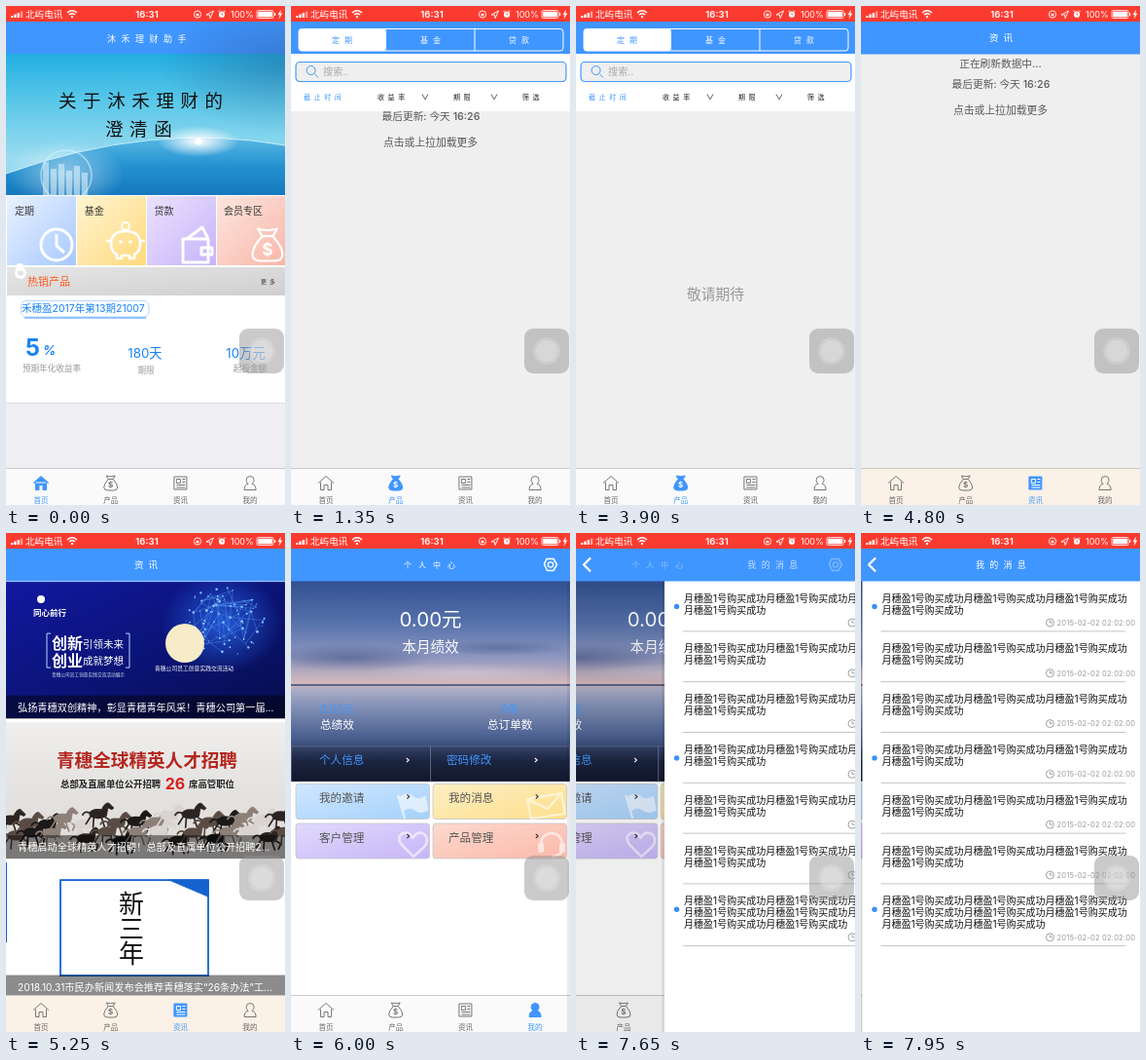
Write an HTML page that moves like this. It is 287 px wide and 512 px high and loops after 8000 ms.

```html
<!DOCTYPE html>
<html lang="zh-CN">
<head>
<meta charset="utf-8">
<title>理财助手</title>
<style>
html, body { margin: 0; width: 100%; height: 100%; overflow: hidden; background: #fff; }
svg { display: block; width: 100%; height: 100%; font-family: Inter, "Noto Sans CJK SC", "Noto Sans CJK", sans-serif; }
</style>
</head>
<body>
<svg id="stage" viewBox="0 0 287 512" preserveAspectRatio="none"></svg>
<script>
const BLUE = '#4096ff', GREY = '#efefef';
const STEP = 150, LOOP = 8000;
const stage = document.getElementById('stage');

let seed = 7;
const random = () => (seed = (seed * 16807) % 2147483647) / 2147483647;
const times = (n, fn) => Array.from({ length: n }, (_, i) => fn(i)).join('');

// y is the vertical centre of the glyphs
const text = (x, y, size, str, fill = '#333', attrs = '') =>
  `<text x="${x}" y="${y + size * .36}" font-size="${size}" fill="${fill}" ${attrs}>${str}</text>`;
const centered = (x, y, size, str, fill, attrs = '') =>
  text(x, y, size, str, fill, `text-anchor="middle" ${attrs}`);
const spaced = (x, y, size, gap, str, fill, attrs = '') =>
  text(x, y, size, str, fill, `letter-spacing="${gap}" ${attrs}`);
const rect = (x, y, w, h, fill, attrs = '') =>
  `<rect x="${x}" y="${y}" width="${w}" height="${h}" fill="${fill}" ${attrs}/>`;
const circle = (x, y, r, fill, attrs = '') => `<circle cx="${x}" cy="${y}" r="${r}" fill="${fill}" ${attrs}/>`;
const ellipse = (x, y, rx, ry, fill, opacity = 1) =>
  `<ellipse cx="${x}" cy="${y}" rx="${rx}" ry="${ry}" fill="${fill}" opacity="${opacity}"/>`;
const line = (d, stroke, width = 1, fill = 'none', attrs = '') =>
  `<path d="${d}" fill="${fill}" stroke="${stroke}" stroke-width="${width}" stroke-linejoin="round" ${attrs}/>`;
const group = (id, body, attrs = '') => `<g id="${id}" ${attrs}>${body}</g>`;
const at = (x, y, body, scale = 1) => `<g transform="translate(${x} ${y}) scale(${scale})">${body}</g>`;
const gradient = (id, colors, diagonal) =>
  `<linearGradient id="${id}" x2="${diagonal ? 1 : 0}" y2="1">${colors.map((c, i) => {
    const [color, offset = i / (colors.length - 1)] = c.split(' ');
    return `<stop offset="${offset}" stop-color="${color}"/>`;
  }).join('')}</linearGradient>`;
const radial = (id, color) =>
  `<radialGradient id="${id}"><stop stop-color="${color}"/><stop offset="1" stop-color="${color}" stop-opacity="0"/></radialGradient>`;

const defs = `<defs>
  ${gradient('sky', ['#22aee2', '#5cc8e9 .35', '#9cdcf0 .75', '#8ed4ee'])}
  ${gradient('earth', ['#58b8e4', '#2391d0 .5', '#1678be'])}
  ${gradient('dusk', ['#31508f', '#5470ab .2', '#8d96bf .38', '#d5b9bd .51', '#adadc6 .54', '#8593b8 .62', '#4a5f90 .78', '#1f2948 .9', '#141a30'])}
  ${gradient('night', ['#1218a0', '#0b1478', '#060d4c'], true)}
  ${gradient('mist', ['#f0efee', '#e4e2e0', '#dedbd8'])}
  ${gradient('blueCard', ['#e9f2ff', '#a7c9ff'], true)}
  ${gradient('yellowCard', ['#fff5d2', '#ffd97d'], true)}
  ${gradient('purpleCard', ['#ebe2fd', '#c6b3fb'], true)}
  ${gradient('pinkCard', ['#fde6df', '#f9b6a8'], true)}
  ${gradient('blueTile', ['#cfe6ff', '#a5d1fb'], true)}
  ${gradient('yellowTile', ['#fdefc4', '#fddf8c'], true)}
  ${gradient('purpleTile', ['#e0dafc', '#c7b5f8'], true)}
  ${gradient('pinkTile', ['#fdd9ce', '#fbb9aa'], true)}
  ${gradient('silver', ['#e6e6e6', '#cfcfcf'], true)}
  ${radial('glow', '#fff')}${radial('blueGlow', '#2a6cf0')}${radial('shade', '#1f3566')}
  <clipPath id="listArea"><rect y="108" width="287" height="366"/></clipPath>
  <clipPath id="feedArea"><rect y="49" width="287" height="463"/></clipPath>
</defs>`;

const navBar = body => rect(0, 16, 287, 33.5, BLUE) + body;
const bag = (color, fill, sign) =>
  line('M-2.5-4 L-4.5-7.5 Q0-6 4.5-7.5 L2.5-4 Z M-2.5-4 Q-7 1 -7 4.5 Q-7 7.5 -3 7.5 H3 Q7 7.5 7 4.5 Q7 1 2.5-4', color, 1, fill)
  + centered(0, 2, 8, '$', sign, 'font-weight="bold"');

const tabIcons = [
  on => line('M-8 0 L0-7 L8 0 M-5.5-1 V7 H-2 V2 H2 V7 H5.5 V-1', on ? BLUE : '#777', 1, on ? BLUE : 'none'),
  on => bag(on ? BLUE : '#777', on ? BLUE : 'none', on ? '#fff' : '#777'),
  on => line('M-6.5-6.5 H6.5 V6.5 H-6.5 Z', on ? BLUE : '#777', 1, on ? BLUE : 'none')
    + line('M-4-4 H0 V0 H-4 Z M2-4 H5 M2-1 H5 M-4 2 H5 M-4 4.5 H5', on ? '#fff' : '#777'),
  on => line('M-6 7 Q-6 1.5 -2 1 Q-4-1 -4-3 A4 4 0 0 1 4-3 Q4-1 2 1 Q6 1.5 6 7 Z', on ? BLUE : '#777', 1, on ? BLUE : 'none')
];
const tabBar = (selected, fill = '#fafafa') =>
  rect(0, 474, 287, 38, fill) + rect(0, 474, 287, .7, '#b5b5b5') +
  ['首页', '产品', '资讯', '我的'].map((label, i) => {
    const on = i === selected, x = 36 + i * 71.7;
    return at(x, 489.5, tabIcons[i](on)) + centered(x, 507, 7.5, label, on ? BLUE : '#666', 'font-weight="500"');
  }).join('');

const cardIcons = [
  at(52, 245, circle(0, 0, 16, 'none', 'stroke="#fff" stroke-width="3"') + line('M0-11 V1 L8 8', '#fff', 3)),
  at(123, 243, line('M-15 1 Q-15-12 0-12 Q15-12 15 1 Q15 9 9 12 V16 H4 V13 H-4 V16 H-9 V12 Q-15 9 -15 1 Z M-15-2 H-20 M15-2 H20', '#fff', 2.6)
    + circle(0, -17, 4, 'none', 'stroke="#fff" stroke-width="2"') + circle(-5, -1, 1.8, '#fff') + circle(5, -1, 1.8, '#fff')),
  at(196, 247, line('M-14-8 H12 V16 H-14 Z M-10-8 L6-20 L12-8 M5 1 H16 V8 H5 Z', '#fff', 3)),
  at(269, 245, bag('#fff', 'none', '#fff'), 2.2)
];
const home = navBar(spaced(104, 34, 9, 5.5, '沐禾理财助手', '#fff'))
  + rect(0, 49, 287, 425, '#fff')
  + rect(0, 49, 287, 145, 'url(#sky)')
  + ellipse(287, 60, 130, 70, 'url(#shade)', .3)
  + line('M0 172 Q150 118 287 143 V194 H0 Z', 'none', 0, 'url(#earth)')
  + line('M0 172 Q150 118 287 143', '#c5edfa', 1)
  + ellipse(198, 139, 42, 16, 'url(#glow)') + circle(198, 139, 3.5, '#fff')
  + ellipse(62, 172, 60, 34, 'url(#glow)', .5)
  + circle(62, 174, 26, 'none', 'stroke="#d4f3fc" stroke-width="1.5" opacity=".6"')
  + times(6, i => rect(38 + i * 8, 160 + (i * 7) % 12, 6, 34 - (i * 7) % 12, '#e0f5fc', 'opacity=".55"'))
  + spaced(54, 97, 18.5, 6.6, '关于沐禾理财的', '#111', 'font-weight="500"')
  + spaced(102, 126, 18.5, 6.6, '澄清函', '#111', 'font-weight="500"')
  + ['blue', 'yellow', 'purple', 'pink'].map((c, i) => rect(1 + i * 72, 195, 71, 71, `url(#${c}Card)`)
    + text(9 + i * 71.7, 210, 10, ['定期', '基金', '贷款', '会员专区'][i])).join('')
  + cardIcons.join('')
  + rect(1, 268, 286, 29, 'url(#silver)')
  + circle(14, 268, 3, 'none', 'stroke="#fff" stroke-width="2"') + circle(15, 274, 4.5, 'none', 'stroke="#fff" stroke-width="3"')
  + text(22, 283, 11, '热销产品', '#ff5a1f', 'font-weight="500"') + spaced(262, 283, 6, 3, '更多', '#333')
  + rect(15.5, 302.5, 131.5, 16.5, '#fff', 'rx="5" stroke="#b7d7ff"') + text(16, 310.5, 10.5, '禾穗盈2017年第13期21007', '#1683f5')
  + rect(19, 319.5, 125, 1, BLUE)
  + text(20, 350, 24, '5', '#1683f5', 'font-weight="bold"') + text(38, 353, 13, '%', '#1683f5', 'font-style="italic" font-weight="bold"')
  + centered(143, 356, 13.3, '180天', '#1683f5') + centered(246.5, 356, 13.3, '10万元', '#1683f5')
  + centered(47, 372, 8.6, '预期年化收益率', '#999') + centered(144, 374, 8.6, '期限', '#999') + centered(251, 372, 8.6, '起投金额', '#999')
  + rect(0, 407, 287, 67, '#efeff4') + rect(0, 407, 287, .8, '#d9d9dd') + tabBar(0);

// pull-to-refresh header, 41 px tall, above the given top edge
const refreshHeader = top => centered(143.5, top - 31, 10.7, '正在刷新数据中...', '#5a5a5a', 'font-weight="500"')
  + centered(144, top - 10, 10.7, '最后更新: 今天 16:26', '#5a5a5a', 'font-weight="500"');
const loadMore = top => centered(143.5, top + 17, 10.8, '点击或上拉加载更多', '#5a5a5a', 'font-weight="500"');

const chevron = x => line(`M${x - 3} 90.5 L${x} 96 L${x + 3} 90.5`, '#666');
const products = navBar(rect(8, 23.5, 272, 22.5, 'none', 'rx="3" stroke="#fff"') + rect(8, 23.5, 90, 22.5, '#fff', 'rx="3"')
    + rect(188.5, 23.5, 1, 22.5, '#fff')
    + spaced(42, 35, 8, 5, '定期', BLUE) + spaced(133, 35, 8, 5, '基金', '#fff') + spaced(224, 35, 8, 5, '贷款', '#fff'))
  + rect(0, 49, 287, 59, '#fff') + rect(0, 108, 287, 366, GREY)
  + rect(5, 57.5, 278, 20, GREY, `rx="4" stroke="${BLUE}" stroke-width="1.2"`)
  + circle(20.5, 66, 4.5, 'none', `stroke="${BLUE}"`) + line('M24 69.5 L28 73.5', BLUE)
  + text(33, 67.5, 10.2, '搜索..', '#aaa')
  + spaced(13, 93.5, 7, 3.6, '截止时间', BLUE) + spaced(89, 93.5, 7, 3.6, '收益率', '#222')
  + spaced(167, 93.5, 7, 3.6, '期限', '#222') + spaced(238, 93.5, 7, 3.6, '筛选', '#222') + chevron(138) + chevron(209)
  + `<g clip-path="url(#listArea)">${group('list', refreshHeader(108) + group('listMore', loadMore(108)))}</g>`
  + group('empty', centered(143.5, 296, 14.8, '敬请期待', '#999')) + tabBar(1);

const network = () => {
  const points = Array.from({ length: 90 }, () => {
    const angle = random() * 6.283, r = Math.sqrt(random());
    return [222 + Math.cos(angle) * r * 44, 91 + Math.sin(angle) * r * 36];
  });
  return points.map(([x, y], i) => {
    const [px, py] = points[(i * 3 + 1) % 90];
    return circle(x, y, .4 + random(), '#8ecbff')
      + (Math.hypot(px - x, py - y) < 42 ? line(`M${x} ${y} L${px} ${py}`, '#5aa6ff', .35) : '');
  }).join('');
};
const horses = () => times(32, i => {
  const x = (i * 18.5) % 290 + random() * 6, y = (i < 16 ? 287 : 305) + random() * 12;
  const color = ['#2b2422', '#5a4c45', '#1c1919', '#8d8078', '#d9d4cf'][i % 5];
  return at(x, y, ellipse(0, 0, 11, 6, color)
    + line('M4-4 Q8-14 13-13 L19-7 L17-5 L12-7 L10 3 Z', color, 1, color)
    + line('M-8 2 L-15 13 M-5 4 L-6 17 M7 3 L15 8 L12 15 M4 4 L8 16 M-10-1 Q-16-4 -19 2', color, 2), .85);
});
const caption = (y, str) => rect(0, y - 12.5, 287, 24, '#000', 'opacity=".45"') + text(12, y, 10.2, str, '#fff');
const articles = rect(0, 49, 287, 430, '#fff')
  + rect(0, 50, 287, 140, 'url(#night)') + ellipse(222, 92, 62, 52, 'url(#blueGlow)', .75) + network()
  + circle(36, 68, 4, '#fff') + centered(45, 82, 8.5, '同心前行', '#fff', 'font-weight="bold"')
  + text(47, 113, 16, '创新', '#fff', 'font-weight="bold"') + text(79, 114, 10.5, '引领未来', '#fff')
  + text(47, 131, 16, '创业', '#fff', 'font-weight="bold"') + text(79, 131, 10.5, '成就梦想', '#fff')
  + line('M46 103 H42 V138 H46 M123 103 H127 V138 H123', '#b5d4ff', 1)
  + text(47, 145, 4.7, '青穗公司员工创意实践交流活动展示', '#cde')
  + circle(184, 113, 20, '#f6ecc8') + text(153, 139, 5.8, '青穗公司员工创意实践交流活动', '#fff')
  + caption(179, '弘扬青穗双创精神，彰显青穗青年风采！青穗公司第一届...')
  + rect(0, 194, 287, 140, 'url(#mist)') + horses()
  + centered(145, 233, 18.6, '青穗全球精英人才招聘', '#b3261e', 'font-weight="bold"')
  + text(56, 258, 9.4, '总部及直属单位公开招聘', '#222', 'font-weight="bold"')
  + centered(174, 257, 16, '26', '#d6201c', 'font-weight="bold"') + text(188, 258, 9.4, '席高管职位', '#222', 'font-weight="bold"')
  + caption(322.5, '青穗启动全球精英人才招聘！总部及直属单位公开招聘2...')
  + rect(0, 338, 287, 140, '#fff') + rect(0, 338, 1, 82, '#1463cf') + rect(56, 356, 152, 98, '#fff', 'stroke="#1463cf" stroke-width="1.8"')
  + line('M168 356 H208 V373 Z', '#1463cf', 1, '#1463cf')
  + ['新', '三', '年'].map((c, i) => centered(129, 381 + i * 25.5, 26, c, '#111', 'font-weight="500"')).join('')
  + caption(466, '2018.10.31市民办新闻发布会推荐青穗落实“26条办法”工...');
const news = rect(0, 49, 287, 430, GREY)
  + `<g clip-path="url(#feedArea)">${group('feed', refreshHeader(49) + group('feedMore', loadMore(49)) + group('articles', articles))}</g>`
  + navBar(spaced(132, 33, 9.5, 5, '资讯', '#fff')) + tabBar(2, '#fbf1e7');

const arrow = (x, y, color) => line(`M${x - 1.2} ${y - 2.2} L${x + 1.2} ${y} L${x - 1.2} ${y + 2.2}`, color, 1.1);
const tile = (x, y, fill, label, icon) => rect(x, y, 137.5, 36, `url(#${fill}Tile)`, 'rx="3" stroke="#c5c5cb" stroke-width=".8"')
  + `<g opacity=".6">${icon}</g>` + text(x + (x < 100 ? 24 : 16), y + 14.5, 11.6, label, '#555') + arrow(x + (x < 100 ? 115.5 : 107), y + 13, '#333');
const mine = rect(0, 49, 287, 463, '#fff') + rect(0, 49, 287, 206, 'url(#dusk)')
  + ellipse(60, 128, 90, 14, 'url(#shade)', .4) + ellipse(215, 118, 70, 8, 'url(#shade)', .3)
  + ellipse(180, 143, 110, 10, 'url(#glow)', .25)
  + line('M0 155 H287 V157 H0 Z', 'none', 0, '#5b6488')
  + centered(143.5, 89, 20.5, '0.00元', '#fff') + centered(143.5, 117, 14.6, '本月绩效', '#fff')
  + text(30, 181, 11.2, '0.00元', BLUE) + text(30, 197, 11.6, '总绩效', '#fff')
  + centered(225, 181, 11.2, '0条', BLUE) + text(202, 197, 11.6, '总订单数', '#fff')
  + rect(.5, 219, 143, 36, '#000', 'fill-opacity=".12" stroke="#7c87a3" stroke-opacity=".55" stroke-width=".8"')
  + rect(143.5, 219, 143, 36, '#000', 'fill-opacity=".12" stroke="#7c87a3" stroke-opacity=".55" stroke-width=".8"')
  + text(29, 233, 11.6, '个人信息', BLUE) + text(160, 233, 11.6, '密码修改', BLUE) + arrow(120, 233, '#fff') + arrow(252, 233, '#fff')
  + tile(5, 257.5, 'blue', '我的邀请', line('M110 269 L117 293', '#fff', 2.5) + line('M112 271 Q120 265 126 271 Q132 275 138 270 L141 284 Q133 289 127 284 Q121 280 116 285 Z', '#fff', 1, '#fff'))
  + tile(146, 257.5, 'yellow', '我的消息', line('M243 273 L278 267 L282 288 L247 293 Z M243 273 L264 283 L278 267', '#fff', 2.2))
  + tile(5, 298, 'purple', '客户管理', line('M126 332 L114 320 Q108 312 115 308 Q122 306 125 313 Q130 305 137 309 Q143 315 137 322 Z', '#fff', 2.5))
  + tile(146, 298, 'pink', '产品管理', line('M257 324 V319 A11 11 0 0 1 279 319 V324 M279 326 Q277 332 268 332', '#fff', 2.5) + rect(254, 318, 6, 10, '#fff', 'rx="2"') + rect(276, 318, 6, 10, '#fff', 'rx="2"'))
  + tabBar(3);

const phrase = '月穗盈1号购买成功';
const messageRow = i => {
  const y = 67 + i * 51.8, last = i === 6, dateY = y + (last ? 37 : 25);
  return (i % 3 ? '' : circle(12.5, y + 8.5, 2.7, '#3b8ff5'))
    + text(20, y, 10, phrase.repeat(3), '#111') + text(20, y + 12, 10, phrase.repeat(last ? 3 : 1), '#111')
    + (last ? text(20, y + 24, 10, phrase.repeat(2), '#111') : '')
    + circle(193, dateY, 4, 'none', 'stroke="#888" stroke-width=".8"') + line(`M193 ${dateY - 2.5} V${dateY} H195.5`, '#888', .8)
    + spaced(200, dateY, 7.5, .2, '2015-02-02 02:02:00', '#999') + rect(19, dateY + 8.5, 252, .8, '#b5b5b5');
};
const messages = rect(-3, 49, 3, 463, '#000', 'opacity=".08"') + rect(0, 49, 287, 463, '#fff') + times(7, messageRow);

const mineNav = navBar(group('mineTitle', spaced(116, 33, 8, 7, '个人中心', '#fff'))
  + group('gear', line('M260.5 32 L263 26.5 H270 L273.5 32.5 L270 38.5 H263.5 Z', '#fff', 1.5) + circle(267, 32.5, 2.7, 'none', 'stroke="#fff" stroke-width="1.2"'))
  + group('messageNav', group('messageTitle', spaced(117, 33, 9, 5.3, '我的消息', '#fff')) + line('M15 25.5 L8 32.5 L15 39.5', '#fff', 2.2)));

const statusBar = rect(0, 0, 287, 16, '#fc3b30')
  + times(4, i => rect(5 + i * 3.3, 10 - i * 1.5, 2.3, 2 + i * 1.5, '#fff', i > 2 ? 'opacity=".5"' : ''))
  + text(20, 8.5, 9.6, '北屿电讯', '#fff')
  + line('M63 7 Q68 2.5 73 7 M65 9 Q68 6.5 71 9', '#fff', 1.4) + circle(68, 11, 1.2, '#fff')
  + centered(145, 8.5, 9.6, '16:31', '#fff', 'font-weight="600"')
  + circle(197, 8.5, 3.6, 'none', 'stroke="#fff" stroke-width=".9"') + rect(195.6, 7.8, 2.8, 2.4, '#fff')
  + line('M206 9 L213.5 5 L210 12.5 L209.5 9 Z', '#fff', .9)
  + circle(222, 8.7, 3.1, '#fff') + line('M222 7 V9 H223.5', '#fc3b30', .7) + line('M218.5 6 L220 4.5 M225.5 6 L224 4.5', '#fff')
  + text(231, 8.5, 9, '100%', '#fff')
  + rect(258, 4.5, 17, 8, 'none', 'rx="1.5" stroke="#fff" stroke-width=".8"') + rect(259.2, 5.7, 14.6, 5.6, '#fff') + rect(276, 7, 1.2, 3, '#fff')
  + line('M282.5 4.5 L280 9 H282 L281 12.5 L284 7.8 H282 Z', '#fff', .4, '#fff');

const floatingButton = rect(240, 331, 46, 46, 'rgba(145,145,145,.48)', 'rx="9"')
  + circle(263, 354, 14, 'rgba(255,255,255,.18)') + circle(263, 354, 11, 'rgba(255,255,255,.2)');

stage.innerHTML = defs + group('home', home) + group('products', products) + group('news', news)
  + group('profile', group('mine', mine + rect(0, 49, 287, 463, '#000', 'id="dim"')) + group('messages', messages) + mineNav)
  + statusBar + floatingButton;

const el = id => document.getElementById(id);
const show = (id, visible) => { el(id).style.display = visible ? '' : 'none'; };
const shift = (id, x, y = 0) => el(id).setAttribute('transform', `translate(${x} ${y})`);
const fade = (id, opacity) => el(id).setAttribute('opacity', opacity);
const easeOut = (t, start) => 1 - (1 - Math.min(1, Math.max(0, (t - start) / 400))) ** 2;

// the header slides open when a tab appears and closes once its content has arrived
function refresh(t, opens, closes, listId, moreId, contentId) {
  shift(listId, 0, 41 * (easeOut(t, opens) - easeOut(t, closes)));
  show(moreId, t < closes);
  show(contentId, t >= closes);
}

function render(now) {
  const t = Math.floor(now % LOOP / STEP) * STEP;
  show('home', t < 1350);
  show('products', t >= 1350 && t < 4050);
  show('news', t >= 4050 && t < 6000);
  show('profile', t >= 6000);

  refresh(t, 1270, 1720, 'list', 'listMore', 'empty');
  refresh(t, 3970, 4870, 'feed', 'feedMore', 'articles');

  const push = t < 7650 ? 0 : 1 - Math.exp(-(t - 7567) * .01383);
  shift('mine', -86 * push);
  fade('dim', .1 * push);
  shift('messages', 287 * (1 - push));
  shift('mineTitle', -86 * push);
  fade('mineTitle', (1 - push) ** .8);
  fade('gear', 1 - push);
  show('messageNav', push > 0);
  shift('messageTitle', 187 * (1 - push));
  fade('messageTitle', push);
}

const began = performance.now();
(function tick() {
  render(performance.now() - began);
  requestAnimationFrame(tick);
})();
</script>
</body>
</html>
```
